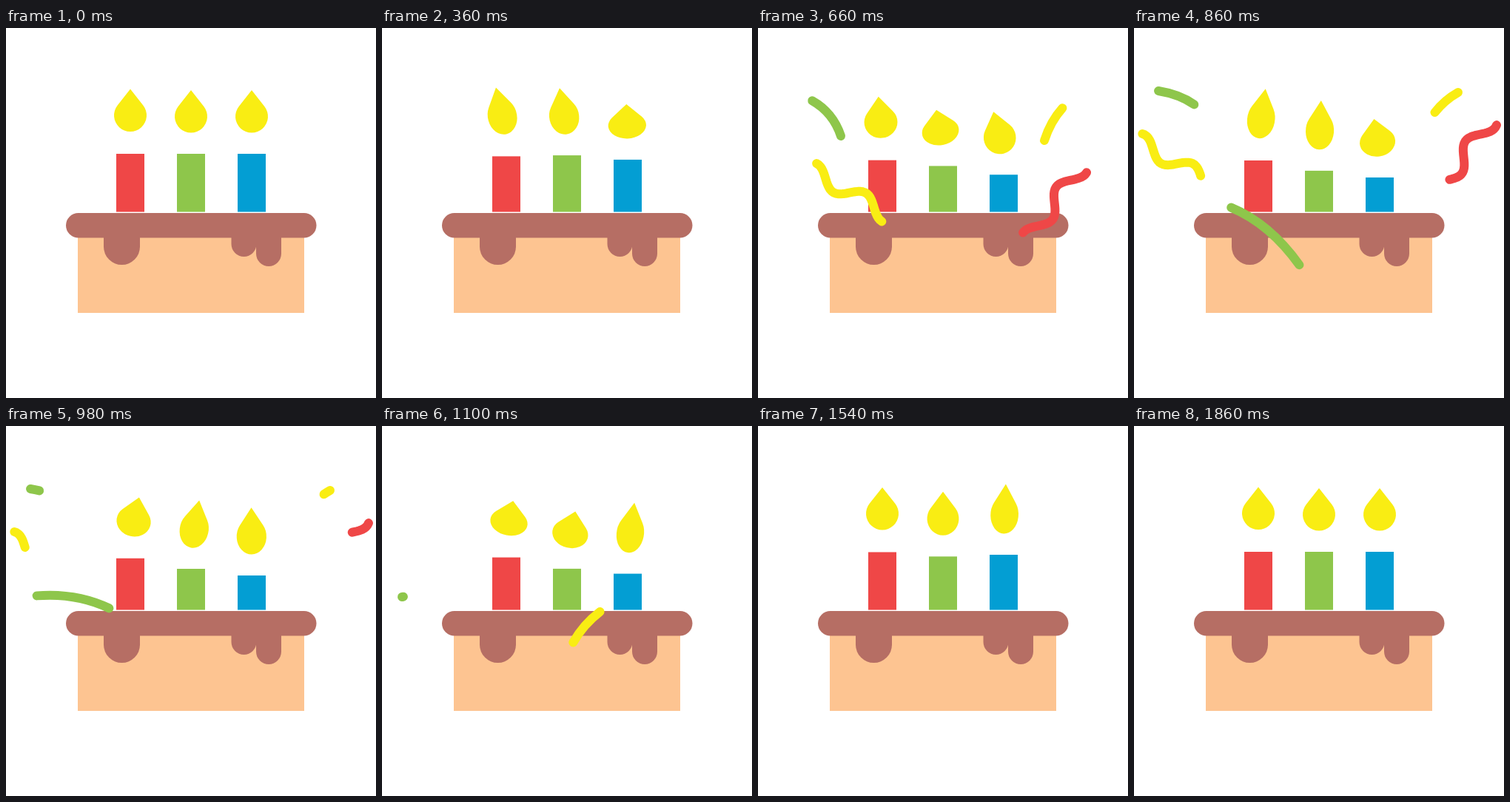
Recreate the animation shown at these times as an HTML page. Size 500 px wide and 500 px high, loop 2 s.

```html
<!DOCTYPE html>
<html lang="en">
<head>
<meta charset="utf-8">
<title>Birthday cake</title>
<style>
  html, body { margin: 0; width: 100%; height: 100%; overflow: hidden; background: #fff; }
  svg { display: block; width: 100%; height: 100%; }
</style>
</head>
<body>
<svg id="stage" viewBox="0 0 500 500">
  <path fill="#fdc491" d="M97 283H403V385H97Z"/>
  <g fill="#b66e64">
    <rect x="81" y="250" width="338.5" height="33.5" rx="16.75"/>
    <path d="M132 270H181V295.5a24.5 24.5 0 0 1-49 0Z"/>
    <path d="M304.5 270H338.5V292a17 17 0 0 1-34 0Z"/>
    <path d="M338 270H372V305a17 17 0 0 1-34 0Z"/>
  </g>
</svg>
<script>
const LOOP = 2000;
const RED = '#ef4747', GREEN = '#8ec64b', BLUE = '#039ed3', YELLOW = '#f9ed13';
const stage = document.getElementById('stage');

function add(tag, attrs) {
  const el = document.createElementNS('http://www.w3.org/2000/svg', tag);
  for (const key in attrs) el.setAttribute(key, attrs[key]);
  return stage.appendChild(el);
}

const progress = ([from, to], t) => Math.min(1, Math.max(0, (t - from) / (to - from)));

// Eases in and out between [time, value] turning points.
function tween(keys, t) {
  let value = keys[0][1];
  for (let i = 1; i < keys.length; i++) {
    const u = progress([keys[i - 1][0], keys[i][0]], t);
    value += (keys[i][1] - keys[i - 1][1]) * u * u * (3 - 2 * u);
  }
  return value;
}

// All candles share these motions, each with its own delays.
const melt = [[150, 0], [800, 1], [980, 1], [1700, 0]];
const stretch = [[0, 0], [110, -1], [325, .8], [520, -1], [830, 1], [1075, -1], [1310, .9], [1500, 0]];
const lean = [[0, 0], [450, -14], [1010, 13], [1400, 0]];

const candles = [
  { x: 168, gap: 30, color: RED, depth: 9, meltDelay: -60, flameDelay: 0 },
  { x: 250, gap: 28.5, color: GREEN, depth: 23, meltDelay: 90, flameDelay: 90 },
  { x: 332, gap: 28.5, color: BLUE, depth: 32, meltDelay: 0, flameDelay: 250 }
];
for (const c of candles) {
  c.wax = add('rect', { x: c.x - 19, width: 38, fill: c.color });
  c.flame = add('path', { fill: YELLOW, d: 'M0-57.5L17.3-35.6A22 22 0 1 1-17.3-35.6Z' });
}

// Cosine wave around the axis from (x1, y1) to (x2, y2).
function wave(x1, y1, x2, y2) {
  const dx = x2 - x1, dy = y2 - y1, length = Math.hypot(dx, dy), points = [];
  for (let u = 0; u <= 1; u += 1 / 64) {
    const side = -11 * Math.cos(u * 5.1 * Math.PI) / length;
    points.push([x1 + dx * u - dy * side, y1 + dy * u + dx * side]);
  }
  return 'M' + points.join('L');
}

// head and tail: when each end of the streamer leaves the start and arrives.
const burst = { head: [460, 797], tail: [700, 1018] };
const streamers = [
  { ...burst, color: GREEN, d: 'M112 146Q95 95 33 85' },
  { ...burst, color: YELLOW, d: 'M387 152Q401 108 438 87' },
  { ...burst, color: YELLOW, d: wave(173, 252, 6, 152) },
  { ...burst, color: RED, d: wave(367, 283, 481.5, 125) },
  { head: [700, 1000], tail: [860, 1103], color: GREEN, d: 'M224 321Q148 214 27 231' },
  { head: [1010, 1185], tail: [1100, 1270], color: YELLOW, d: 'M258 293Q283 248 340 226' }
];
for (const s of streamers) {
  s.line = add('path', { d: s.d, pathLength: 1, fill: 'none', stroke: s.color,
    'stroke-width': 12, 'stroke-linecap': 'round', 'stroke-linejoin': 'round' });
}

function draw() {
  const t = performance.now() % LOOP;
  for (const c of candles) {
    const top = 170 + c.depth * tween(melt, t - c.meltDelay);
    const s = tween(stretch, t - c.flameDelay);
    c.wax.setAttribute('y', top);
    c.wax.setAttribute('height', 248.5 - top);
    c.flame.setAttribute('transform', `translate(${c.x} ${top - c.gap}) `
      + `rotate(${tween(lean, t - c.flameDelay)}) scale(${1 - .165 * s} ${1 + .19 * s})`);
  }
  for (const { line, head, tail } of streamers) {
    const end = progress(head, t), start = progress(tail, t);
    line.style.display = end > start ? '' : 'none';
    line.setAttribute('stroke-dasharray', `${end - start} 2`);
    line.setAttribute('stroke-dashoffset', -start);
  }
  requestAnimationFrame(draw);
}
draw();
</script>
</body>
</html>
```
